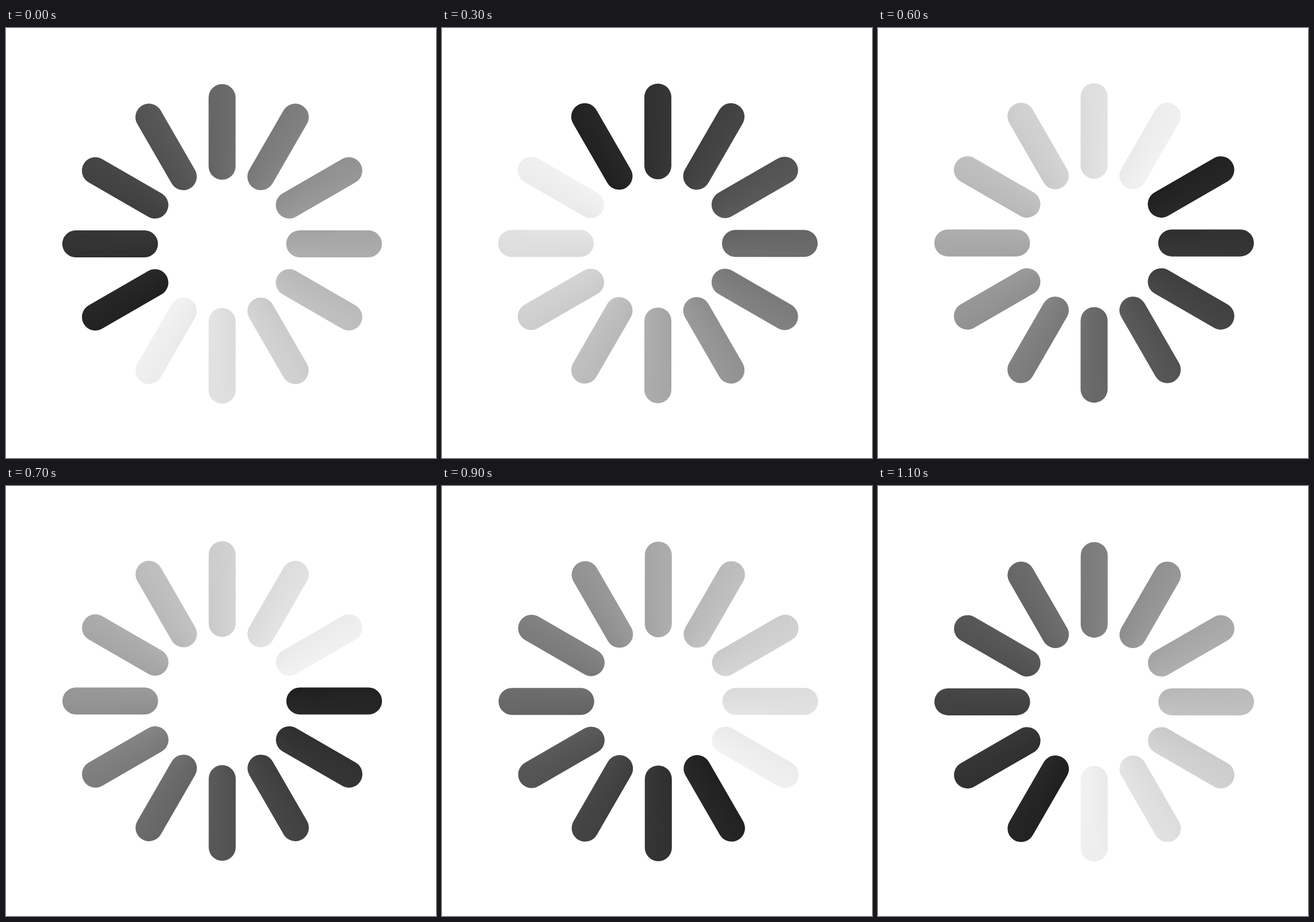
These frames come from a looping animation (748 by 748 pixels, 1.2 s). An HTML page with a canvas:

```html
<!DOCTYPE html>
<html lang="en">
<head>
<meta charset="utf-8">
<title>Spinner</title>
<style>
  html, body { margin: 0; width: 100%; height: 100%; overflow: hidden; background: #fff; }
  canvas { display: block; width: 748px; height: 748px; }
</style>
</head>
<body>
<canvas id="stage" width="748" height="748"></canvas>
<script>
const SIZE = 748;
const ctx = document.getElementById('stage').getContext('2d');

const BARS = 12, STEP_MS = 100;
const OUTER = 278, INNER = 111.5, WIDTH = 47;
const TURN = 2 * Math.PI, SLICE = TURN / BARS;
const DARKEST = 29, LIGHTEST = 245, BEND = 7;

// Grey around the ring, p = 0 at the dark head, 1 at the light tail:
// a straight ramp with a slight S bend
function grey(p) {
  const v = DARKEST + (LIGHTEST - DARKEST) * p - BEND * Math.sin(TURN * p);
  return `rgb(${v},${v},${v})`;
}

function sweep(step) {
  // The seam sits midway between the lightest and the darkest bar
  const fill = ctx.createConicGradient((step + 7.5) * SLICE - TURN / 4, 0, 0);
  const stops = 2 * BARS;
  for (let i = 0; i <= stops; i++) fill.addColorStop(i / stops, grey(i / stops));
  return fill;
}

function draw(step) {
  ctx.setTransform(1, 0, 0, 1, 0, 0);
  ctx.fillStyle = '#fff';
  ctx.fillRect(0, 0, SIZE, SIZE);

  // The ring's centre drifts along a tiny ellipse
  const drift = step * SLICE;
  ctx.translate(375.9 - 0.4 * Math.sin(drift), 374.7 + 0.8 * Math.cos(drift));

  ctx.strokeStyle = sweep(step);
  ctx.lineWidth = WIDTH;
  ctx.lineCap = 'round';
  const near = INNER + WIDTH / 2, far = OUTER - WIDTH / 2;
  ctx.beginPath();
  for (let i = 0; i < BARS; i++) {
    const x = Math.cos(i * SLICE), y = Math.sin(i * SLICE);
    ctx.moveTo(x * near, y * near);
    ctx.lineTo(x * far, y * far);
  }
  ctx.stroke();
}

function tick() {
  draw(Math.floor(performance.now() / STEP_MS) % BARS);
  requestAnimationFrame(tick);
}
tick();
</script>
</body>
</html>
```
